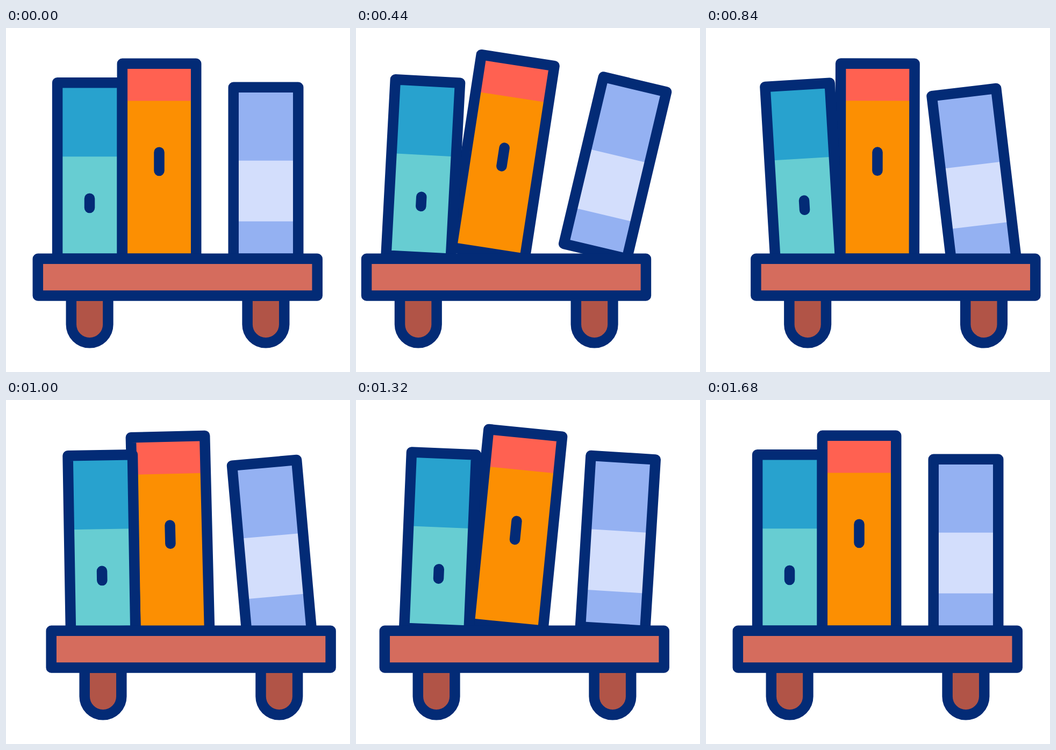
Recreate the animation shown at these times as an HTML page. Size 640x640 px, loop 2.08 s.

```html
<!DOCTYPE html>
<html lang="en">
<head>
<meta charset="utf-8">
<title>Rolling bookshelf</title>
<style>
  html, body { margin: 0; width: 100%; height: 100%; overflow: hidden; background: #fff; }
  svg { display: block; width: 100%; height: 100%; }
  .line { fill: none; stroke: #032b76; stroke-width: 19.5; stroke-linejoin: round; stroke-linecap: round; }
</style>
</head>
<body>
<svg viewBox="0 0 640 640">
  <defs>
    <path id="wheel" class="line" style="fill:#b15447" d="M-34.3 498V551.5a34.3 34.3 0 0 0 68.6 0V498z"/>
  </defs>
  <g id="cart">
    <g id="orange">
      <path fill="#fc8f02" d="M216.3 66.3H353.7V429.3H216.3z"/>
      <path fill="#ff6151" d="M216.3 66.3H353.7V135.6H216.3z"/>
      <path class="line" d="M216.3 66.3H353.7V429.3H216.3zM285 231.2V265.5"/>
    </g>
    <g id="teal">
      <path fill="#67cdd2" d="M95.6 101.7H216V429.3H95.6z"/>
      <path fill="#28a2ce" d="M95.6 101.7H216V239.2H95.6z"/>
      <path class="line" d="M95.6 101.7H216V429.3H95.6zM155.5 317.2V334.6"/>
    </g>
    <g id="blue">
      <path fill="#94b1f2" d="M423.2 110.3H543.7V429.3H423.2z"/>
      <path fill="#d3defc" d="M423.2 246.8H543.7V359.8H423.2z"/>
      <path class="line" d="M423.2 110.3H543.7V429.3H423.2z"/>
    </g>
    <use href="#wheel" x="155.6"/>
    <use href="#wheel" x="483.4"/>
    <path class="line" style="fill:#d56c5d" d="M59.3 429.3H579.2V497.9H59.3z"/>
  </g>
</svg>
<script>
  const LOOP = 2080, STEP = 40, END = 1680;
  const SOFT = [1 / 3, 2 / 3], SHARP = [0.55, 0.5];

  // Each key: [time in ms, value, easing into it]
  const cart = [[0, 0], [495, -41.2, SOFT], [903, 36.5, SHARP], [1172, -18.5, SHARP], [1417, 0, SHARP]];

  // Books tilt about their lower right corner
  const books = [
    { id: 'teal', pivot: 216, keys: [[0, 0], [480, 3.1], [868, -3.5], [1177, 3], [END, 0]] },
    { id: 'orange', pivot: 353.7, keys: [[0, 0], [500, 9.1], [865, 0], [1085, -2.1], [1387, 6.8], [END, 0]] },
    { id: 'blue', pivot: 543.7, keys: [[0, 0], [500, 13.9], [865, -7.05], [1352, 3.65], [END, 0]] }
  ];

  // Cubic bezier with control points (a, 0) and (b, 1)
  function ease(x, [a, b]) {
    let lo = 0, hi = 1, s = x;
    for (let i = 0; i < 24; i++) {
      s = (lo + hi) / 2;
      const r = 1 - s;
      if (3 * a * s * r * r + 3 * b * s * s * r + s * s * s < x) lo = s; else hi = s;
    }
    return s * s * (3 - 2 * s);
  }

  function valueAt(keys, t) {
    const i = keys.findIndex(k => k[0] > t);
    if (i < 0) return keys[keys.length - 1][1];
    const [t0, v0] = keys[i - 1], [t1, v1, curve = SOFT] = keys[i];
    return v0 + (v1 - v0) * ease((t - t0) / (t1 - t0), curve);
  }

  const el = id => document.getElementById(id);

  function draw(time) {
    const t = Math.min(END, Math.floor((time % LOOP + 2) / STEP) * STEP);
    el('cart').setAttribute('transform', `translate(${valueAt(cart, t)} 0)`);
    for (const { id, pivot, keys } of books) {
      el(id).setAttribute('transform', `rotate(${valueAt(keys, t)} ${pivot} 429.3)`);
    }
  }

  const start = performance.now();
  function tick() {
    draw(Math.max(0, performance.now() - start));
    requestAnimationFrame(tick);
  }
  tick();
</script>
</body>
</html>
```
